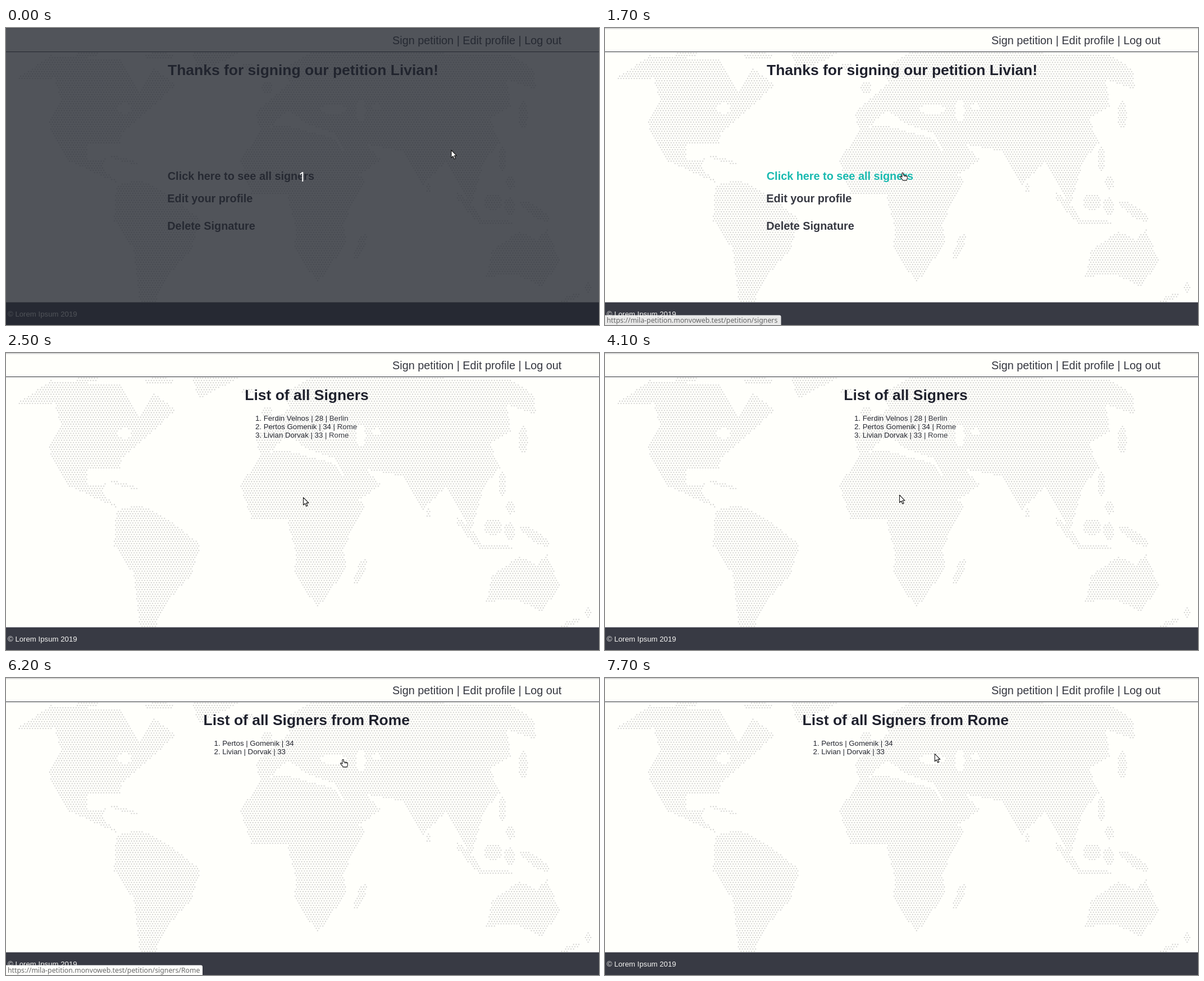
These frames come from a looping animation (1056 px wide and 530 px high, 8000 ms). An HTML page with a canvas:

```html
<!DOCTYPE html>
<html lang="en">
<head>
<meta charset="utf-8">
<title>Petition</title>
<style>
  html, body { margin: 0; width: 100%; height: 100%; overflow: hidden; background: #fffffb; }
  canvas, svg { position: absolute; left: 0; top: 0; width: 1056px; height: 530px; }
  text { font: 13.23px "Liberation Sans", Arial, sans-serif; fill: #22242e; white-space: pre; }
  .title { font-size: 26.46px; font-weight: bold; fill: #1f212d; }
  .nav { font-size: 19.84px; fill: #34363f; }
  .link { font-size: 19.84px; font-weight: bold; fill: #363841; }
  .city { fill: #363841; }
  .hover { fill: #19bab0; }
  .foot { fill: #f4f4f2; }
  .url { font: 12.3px "Noto Sans", "Open Sans", sans-serif; fill: #696969; }
  .count { font: 24px "Noto Sans", "Open Sans", sans-serif; fill: #fff; text-anchor: middle; }
  .pointer path { fill: #fff; stroke: #111; stroke-width: 1.1; stroke-linejoin: round; }
</style>
</head>
<body>
<canvas id="map" width="1056" height="530"></canvas>
<svg viewBox="0 0 1056 530">
  <rect y="0.5" width="1056" height="1" fill="#b4b4b8"/>
  <rect y="42" width="1056" height="1" fill="#2b2d36"/>
  <text class="nav" x="688" y="28.7">Sign petition | Edit profile | Log out</text>

  <g id="thanks">
    <text class="title" x="288" y="84">Thanks for signing our petition Livian!</text>
    <text id="all" class="link" x="287.8" y="271">Click here to see all signers</text>
    <text class="link" x="287.3" y="310.5">Edit your profile</text>
    <text class="link" x="287.3" y="360">Delete Signature</text>
  </g>
  <g id="list">
    <text class="title" x="425.3" y="84">List of all Signers</text>
    <text x="444" y="120.7">1. Ferdin Velnos | 28 | <tspan class="city">Berlin</tspan></text>
    <text x="444" y="135.6">2. Pertos Gomenik | 34 | <tspan class="city">Rome</tspan></text>
    <text x="444" y="150.5">3. Livian Dorvak | 33 | <tspan id="town" class="city">Rome</tspan></text>
  </g>
  <g id="local">
    <text class="title" x="351.5" y="84">List of all Signers from Rome</text>
    <text x="370.6" y="120.7">1. Pertos | Gomenik | 34</text>
    <text x="370.6" y="135.6">2. Livian | Dorvak | 33</text>
  </g>

  <rect y="489.5" width="1056" height="41" fill="#383a44"/>
  <text class="foot" x="3" y="514.5">© Lorem Ipsum 2019</text>
  <g id="status">
    <path id="bubble" fill="#fdfdfb"/>
    <text id="url" class="url" x="3" y="526"></text>
  </g>

  <g id="dim">
    <rect width="1056" height="530" fill="#22262f" fill-opacity="0.784"/>
    <text class="count" x="527.5" y="274">1</text>
  </g>
  <g id="pointer" class="pointer">
    <path id="arrow" d="M.5 .5V14L3.6 11.2L5.8 16.2L8 15.2L5.8 10.3H10Z"/>
    <g id="hand" transform="translate(-5 0)">
      <path d="M3.9 8.6V1.7Q5.1-.2 6.4 1.7V5.3L11.6 6.1Q13.3 6.4 13.3 8V10.5Q13 12.3 12.2 14.4H5.3Q4.6 12.6 2.5 10.7L.6 8.5Q.4 6.8 2 7.2Z"/>
      <path d="M8.6 5.8V8M10.9 6.2V8"/>
    </g>
  </g>
</svg>
<script>
const $ = id => document.getElementById(id);
const LOOP = 8000;

// Rough coastlines
const coasts = {
  northAmerica: "14 94 80 49 206 57 238 115 262 70 303 102 272 130 205 190 204 206 145 205 146 237 180 233 172 250 202 278 108 236 75 170 98 128 86 90",
  greenland: "332 43 419 43 343 82",
  southAmerica: "196 280 240 271 290 297 347 342 330 396 285 446 266 490 238 490 228 396 192 343",
  africa: "455 178 500 174 586 198 640 277 601 346 606 385 555 456 514 395 516 355 500 296 437 296 417 238",
  eurasia: "448 176 446 150 505 98 490 74 545 43 895 46 940 74 944 110 892 92 899 140 862 163 880 204 850 241 840 278 829 318 785 238 742 280 705 220 640 207 668 235 622 268 588 190 545 175 500 148 470 178",
  australia: "855 445 865 397 914 363 945 378 963 358 986 415 956 462 905 439"
};
// Islands and lakes: x, y, radii, tilt
const islands = [
  [145, 47, 26, 3], [272, 50, 27, 6], [430, 69, 12, 5], [465, 106, 9, 12],
  [921, 155, 8, 24], [884, 235, 6, 24], [898, 276, 9, 11], [212, 236, 25, 4, 0.25],
  [631, 390, 7, 25, 0.4], [752, 285, 4, 8], [824, 320, 7, 34, -0.7], [872, 347, 33, 4],
  [867, 311, 16, 15], [897, 318, 10, 15], [942, 327, 30, 9, 0.6],
  [1037, 463, 7, 9], [1007, 481, 20, 5, -0.4]
];
const lakes = [[211, 143, 12, 9], [583, 145, 22, 8], [632, 148, 8, 20], [659, 141, 8, 6]];

function oval([x, y, rx, ry, tilt = 0]) {
  const path = new Path2D();
  path.ellipse(x, y, rx, ry, tilt, 0, Math.PI * 2);
  return path;
}

function drawMap() {
  const ctx = $("map").getContext("2d");
  const land = Object.values(coasts).map(points => new Path2D(`M${points}Z`)).concat(islands.map(oval));
  const water = lakes.map(oval);
  const dx = 4.7, dy = 4.1;
  ctx.fillStyle = "#d2d2d0";
  for (let row = 0, y = 45; y < 489; row++, y += dy) {
    for (let x = 12 + (row % 2) * dx / 2; x < 1052; x += dx) {
      const inside = path => ctx.isPointInPath(path, x, y);
      if (!land.some(inside) || water.some(inside)) continue;
      ctx.beginPath();
      ctx.arc(x, y, 1.15, 0, Math.PI * 2);
      ctx.fill();
    }
  }
}

// Pointer: time, x, y; a glide runs from the previous position
const GLIDE = true;
const moves = [
  [0, 792.5, 217.5], [1100, 792.5, 217.5], [1400, 548.5, 233, GLIDE],
  [1600, 535, 254], [1700, 530, 257.5], [1900, 534.5, 259.5], [2100, 530, 257.5], [2400, 529, 257.3],
  [4100, 524, 253], [4700, 599.5, 153.5, GLIDE], [5200, 600, 149.5], [5500, 600, 144.5],
  [7200, 599, 145.5], [7500, 566.5, 130.5, GLIDE], [7700, 586.8, 134.8, GLIDE]
];
// Status bubble opacity: time, value
const fades = [
  [0, 0], [1600, 0.45], [1700, 0.9], [1900, 1], [2400, 0.5], [2500, 0],
  [5300, 0.9], [5500, 1], [6400, 0.85], [6600, 0.4], [6700, 0]
];

const last = (steps, t) => steps.findLastIndex(step => step[0] <= t);
const within = (t, from, to) => t >= from && t < to;
const show = (id, on) => $(id).setAttribute("visibility", on ? "visible" : "hidden");

// The screen was refreshed ten times a second
function pointerAt(time) {
  const t = Math.floor(time / 100) * 100;
  const i = last(moves, t);
  const [t0, x, y] = moves[i];
  const [t1, nx, ny, glide] = moves[i + 1] || moves[i];
  const k = glide && t1 > t0 ? (t - t0) / (t1 - t0) : 0;
  return [x + (nx - x) * k, y + (ny - y) * k];
}

const host = "//mila-petition.monvoweb.test";
function setStatus(path, width) {
  $("url").textContent = `https:${host}/petition/signers${path}`;
  $("bubble").setAttribute("d", `M0 512.5H${width - 3}q3 0 3 3V530H0Z`);
}

function render(t) {
  show("dim", t < 500);
  show("thanks", t < 2300);
  show("list", within(t, 2300, 6200));
  show("local", t >= 6200);
  $("all").classList.toggle("hover", within(t, 1600, 2300));
  $("town").classList.toggle("hover", within(t, 5200, 6200));

  if (t < 4000) setStatus("", 313.5);
  else setStatus("/Rome", 350);
  $("status").setAttribute("opacity", fades[last(fades, t)][1]);

  const [x, y] = pointerAt(t);
  const pointing = within(t, 1600, 2400) || within(t, 5200, 7100);
  $("pointer").setAttribute("transform", `translate(${x} ${y})`);
  show("hand", pointing);
  show("arrow", !pointing);
}

drawMap();
const start = performance.now();
function tick() {
  render((performance.now() - start) % LOOP);
  requestAnimationFrame(tick);
}
tick();
</script>
</body>
</html>
```
